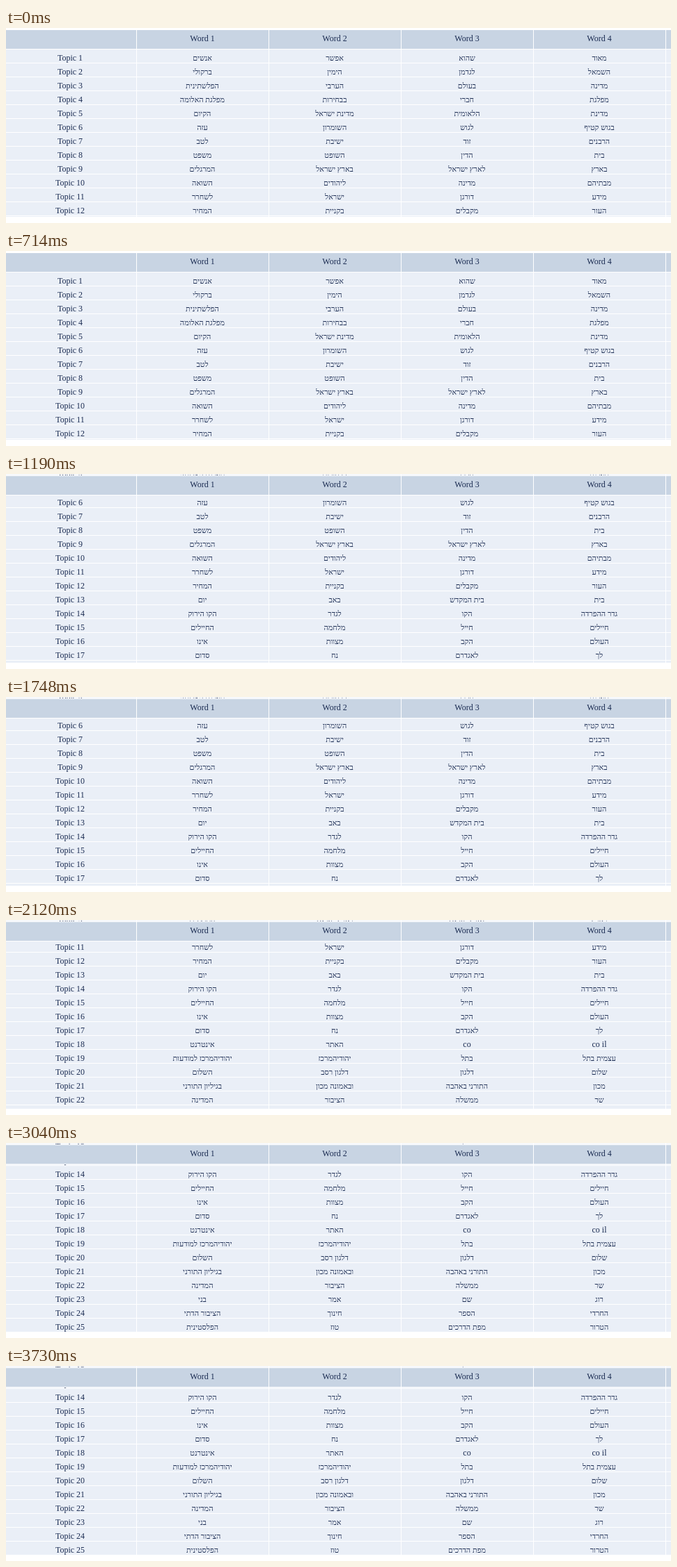
An HTML page for the animation above (4190 ms loop, 955x281 px).

```html
<!DOCTYPE html>
<html lang="en">
<head>
<meta charset="utf-8">
<title>Topic table</title>
<style>
  html, body { margin: 0; width: 100%; height: 100%; overflow: hidden; background: #fff; }
  svg { display: block; }
  text { font: 12px "Liberation Serif", "Times New Roman", serif; fill: #1b2c52; text-anchor: middle; }
  .hebrew { font-size: 11px; }
  .head { fill: #c8d4e3; }
  .body { fill: #eaeff7; }
</style>
</head>
<body>
<svg width="955" height="281" viewBox="0 0 955 281">
  <clipPath id="view"><rect y="1" width="955" height="271"/></clipPath>
  <g clip-path="url(#view)"><g id="rows"></g></g>
  <rect y="2" width="955" height="29" fill="#fff"/>
  <g id="header"></g>
</svg>
<script>
const topics = `אנשים|אפשר|שהוא|מאוד
ברקולי|הימין|לגדמן|השמאל
הפלשתינית|הערבי|בעולם|מדינה
מפלגת האלומה|בבחירות|חברי|מפלגת
הקיום|מדינת ישראל|הלאומית|מדינת
עזה|השומרון|לגוש|בגוש קטיף
לטב|ישיבת|זוד|הרבנים
משפט|השופט|הדין|בית
המרגלים|בארץ ישראל|לארץ ישראל|בארץ
השואה|ליהודים|מדינה|מבתיהם
לשחרר|ישראל|דורגן|מידע
המחיר|בקניית|מקבלים|העור
יום|באב|בית המקדש|בית
הקו הירוק|לגדר|הקו|גדר ההפרדה
החיילים|מלחמה|חייל|חיילים
אינו|מצוות|הקב|העולם
סדום|נח|לאגדרם|לך
אינטרנט|האתר|co|co il
יהודיהמרכז למודעות|יהודיהמרכז|בתל|עצמית בתל
השלום|דלגון רסב|דלגון|שלום
בגיליון התורני|ובאמונה מכון|התורני באהבה|מכון
המדינה|הציבור|ממשלה|שר
בני|אמר|שם|רוג
הציבור הדתי|חינוך|הספר|החרדי
הפלסטינית|טוז|מפת הדרכים|הטרור`.split("\n").map(line => line.split("|"));

const COLUMN = 190, LEFT = -2, ROW = 20, FIRST_ROW = 31, BASELINE = 16;
const LOOP = 4190;
const scrollSteps = [[0, 0], [1190, 102], [2120, 204], [3040, 258]]; // [start ms, offset]

// One table row: five visible columns plus the edge of a sixth.
function row(labels, top, height, kind) {
  let out = "";
  for (let i = 0; i < 6; i++) {
    const x = LEFT + i * COLUMN;
    out += `<rect class="${kind}" x="${x}" y="${top}" width="${COLUMN - 1}" height="${height}"/>`;
    const label = labels[i] || "";
    const script = /[א-ת]/.test(label) ? "hebrew" : "latin";
    if (label) out += `<text class="${script}" x="${x + 94}" y="${top + BASELINE}">${label}</text>`;
  }
  return out;
}

const rows = document.getElementById("rows");
rows.innerHTML = topics.map((words, i) =>
  row([`Topic ${i + 1}`, ...words], FIRST_ROW + i * ROW, ROW - 1, "body")).join("");

document.getElementById("header").innerHTML =
  row(["", "Word 1", "Word 2", "Word 3", "Word 4"], 3, 27, "head");

function draw() {
  const time = performance.now() % LOOP;
  const [, offset] = scrollSteps.findLast(([start]) => time >= start);
  rows.setAttribute("transform", `translate(0 ${-offset})`);
  requestAnimationFrame(draw);
}
draw();
</script>
</body>
</html>
```
